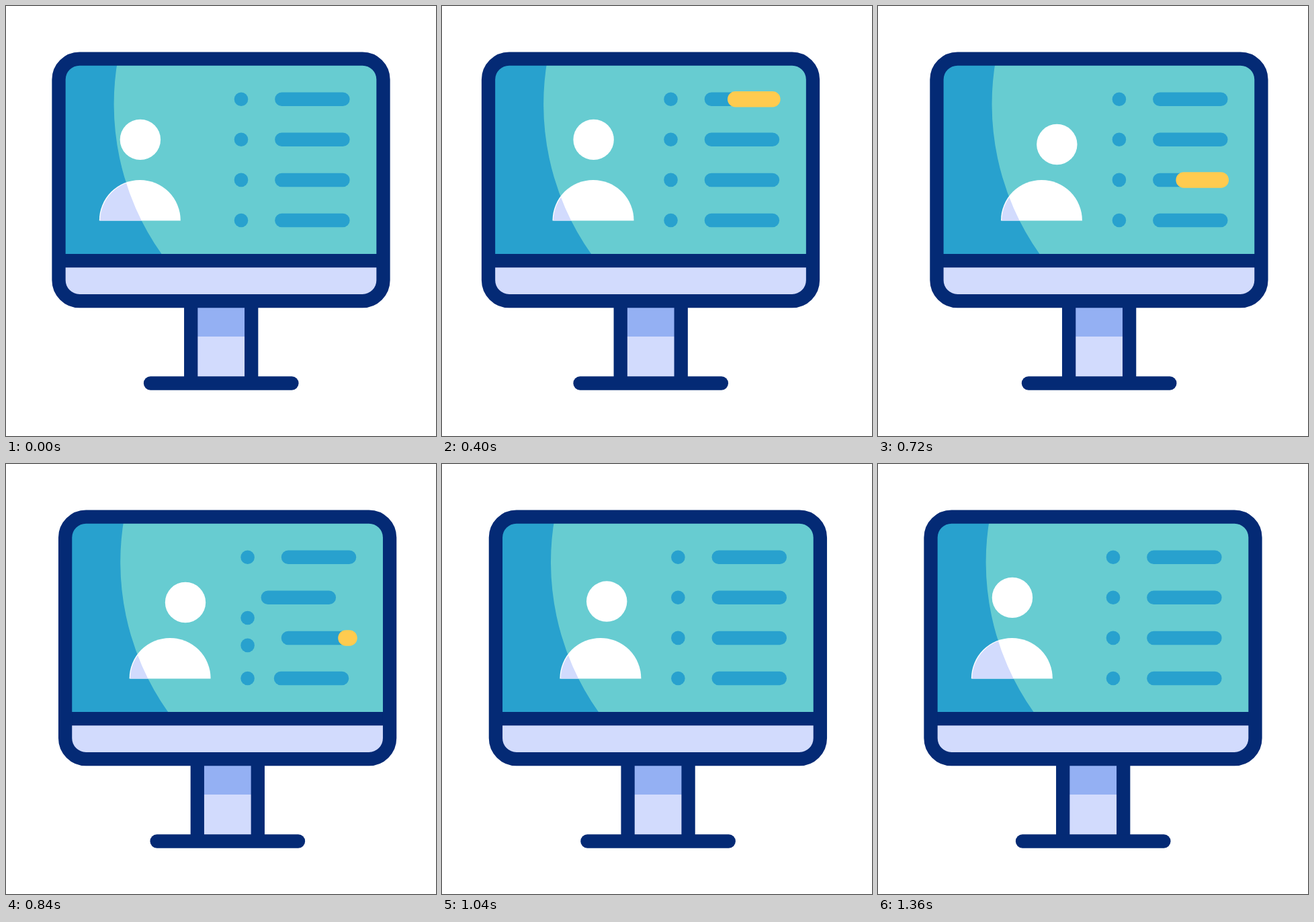
An HTML page that plays this animation: 640 by 640 pixels, repeating every 1480 ms.

```html
<!DOCTYPE html>
<html lang="en">
<head>
<meta charset="utf-8">
<title>Profile on a monitor</title>
<style>
  html, body { margin: 0; width: 100%; height: 100%; overflow: hidden; background: #fff; }
  svg { display: block; width: 100vw; height: 100vh; }
  .navy { fill: none; stroke: #042a75; stroke-width: 20.3; }
  .round { stroke-linecap: round; }
  .bar { stroke: #28a1ce; stroke-width: 20.5; stroke-linecap: round; }
  .mark { stroke: #ffcb4f; stroke-width: 23.5; stroke-linecap: round; }
  .dot { fill: #28a1ce; }
</style>
</head>
<body>
<svg viewBox="0 0 640 640">
  <defs>
    <clipPath id="screen"><rect x="78.5" y="78.6" width="483" height="360.5" rx="31"/></clipPath>
    <clipPath id="shade"><path d="M70 70H168.2A386 386 0 0 0 231.5 369V380H70Z"/></clipPath>
  </defs>
  <g id="monitor">
    <path d="M275 440H365V561H275Z" fill="#d2dbfd"/>
    <path d="M275 440H365V492H275Z" fill="#94b0f3"/>
    <path class="navy" d="M275.2 440V561M365.2 440V561"/>
    <path class="navy round" d="M215 561.5H425.4"/>
    <g clip-path="url(#screen)">
      <path d="M70 70H570V380H70Z" fill="#67ccd1"/>
      <path d="M70 70H570V380H70Z" fill="#28a1ce" clip-path="url(#shade)"/>
      <path d="M70 380H570V445H70Z" fill="#d2dbfd"/>
    </g>
    <path class="navy" d="M78.5 379.2H561.5"/>
    <rect class="navy" x="78.5" y="78.6" width="483" height="360.5" rx="31"/>
    <path class="body" d="M138.8 319.4a60.5 60.5 0 0 1 121 0Z" fill="#fff"/>
    <g clip-path="url(#shade)">
      <path class="body" d="M140.1 319.4a59.4 59.4 0 0 1 118.8 0Z" fill="#d2dbfd"/>
    </g>
    <circle id="head" cx="199.9" cy="198.9" r="30.2" fill="#fff"/>
    <g id="list"></g>
  </g>
</svg>
<script>
const STEP = 40, LAST = 1360, LOOP = 1480;
const ROW_TOP = 138.7, ROW_GAP = 60.1, BAR_X = 410.4, BAR_LEN = 91;
const $ = id => document.getElementById(id);

// Each track is a list of [time, value] keys with smooth easing between them.
const tracks = {
  sway: [[244, 0], [524, -16.2], [760, 11], [1120, 0]],
  walk: [[0, 0], [295, 35.2], [1070, 35.2], [1365, 0]],
  tilt: [[400, 0], [550, 1], [960, 1], [1140, 0]],
  nudgeA: [[720, 0], [840, 30.2], [960, 0]],
  nudgeB: [[791, 0], [911, 30.2], [1031, 0]],
  sweep: [[120, 0], [400, 1]]
};

function value(keys, t) {
  if (t <= keys[0][0]) return keys[0][1];
  for (let i = 1; i < keys.length; i++) {
    const [t0, a] = keys[i - 1], [t1, b] = keys[i];
    if (t < t1) {
      const p = (t - t0) / (t1 - t0);
      return a + (b - a) * p * p * (3 - 2 * p);
    }
  }
  return keys[keys.length - 1][1];
}

function add(tag, cls, attrs) {
  const el = document.createElementNS("http://www.w3.org/2000/svg", tag);
  el.setAttribute("class", cls);
  for (const k in attrs) el.setAttribute(k, attrs[k]);
  return $("list").appendChild(el);
}

const line = (cls, y) => add("line", cls, { x1: BAR_X, x2: BAR_X + BAR_LEN, y1: y, y2: y });
const rows = [0, 1, 2, 3].map(i => {
  const y = ROW_TOP + i * ROW_GAP;
  return { dot: add("circle", "dot", { cx: 350, cy: y, r: 10.3 }), bar: line("bar", y) };
});
const marks = [[0, 0], [2, 320]].map(([row, delay]) => ({
  el: line("mark", ROW_TOP + row * ROW_GAP), delay
}));

const bodies = document.querySelectorAll(".body");
const move = (el, x, y = 0) => el.setAttribute("transform", `translate(${x.toFixed(2)} ${y.toFixed(2)})`);

function draw(t) {
  const at = name => value(tracks[name], t);
  const walk = at("walk"), angle = at("tilt") * Math.PI / 2;
  move($("monitor"), at("sway"));
  bodies.forEach(b => move(b, walk));
  move($("head"), walk + 22.3 * (1 - Math.cos(angle)), 7.1 * Math.sin(angle));

  const a = at("nudgeA"), b = at("nudgeB");
  move(rows[1].bar, -a);
  move(rows[3].bar, -b);
  move(rows[1].dot, 0, a);
  move(rows[2].dot, 0, b);

  for (const { el, delay } of marks) {
    const end = value(tracks.sweep, t - delay);
    const start = value(tracks.sweep, t - delay - 160);
    el.setAttribute("x1", BAR_X + BAR_LEN * start);
    el.setAttribute("x2", BAR_X + BAR_LEN * end);
    el.setAttribute("visibility", end > start ? "visible" : "hidden");
  }
}

const begin = performance.now();
function tick() {
  const t = (performance.now() - begin) % LOOP;
  draw(Math.min(Math.floor(t / STEP) * STEP, LAST));
  requestAnimationFrame(tick);
}
tick();
</script>
</body>
</html>
```
